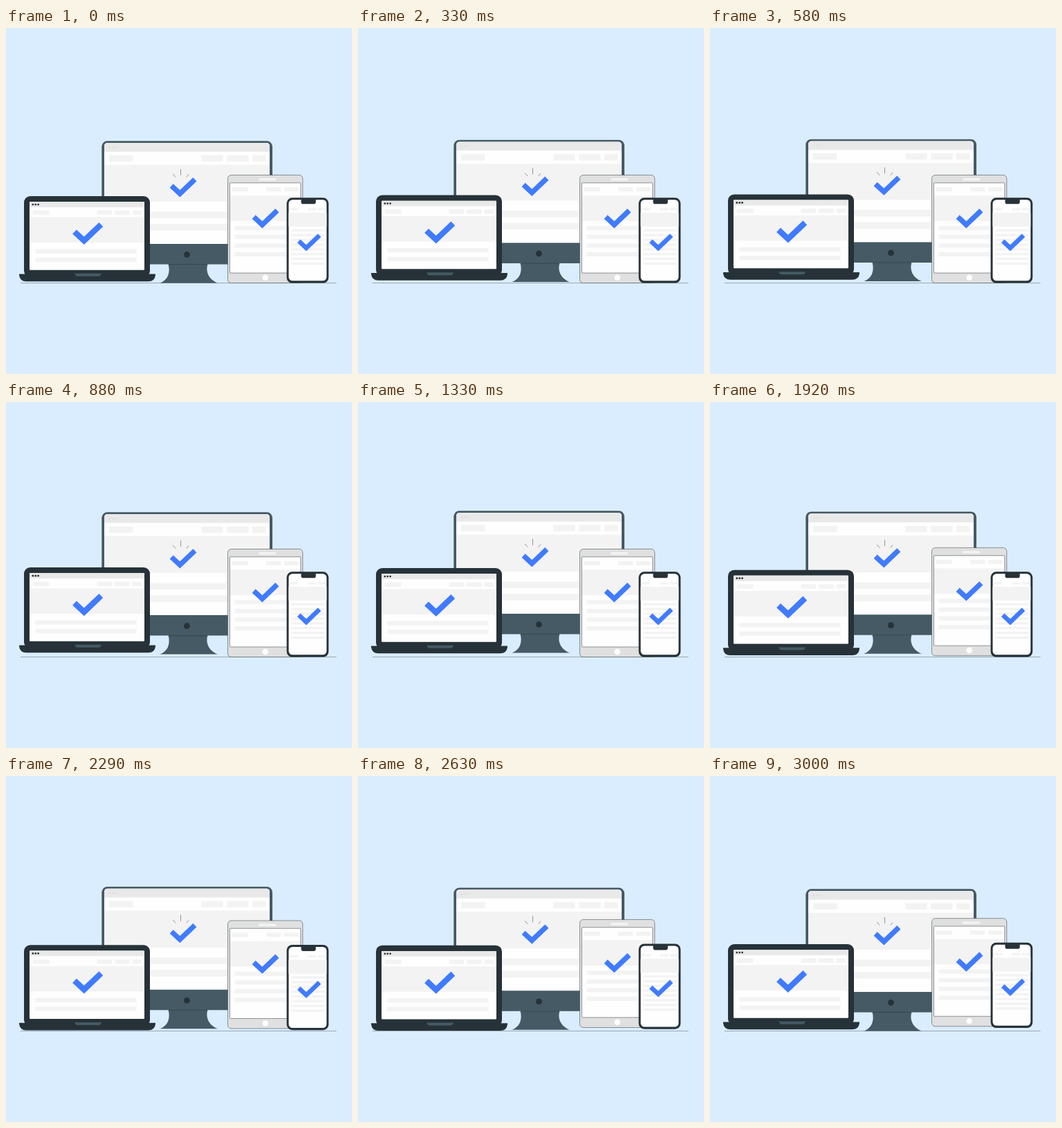
These frames come from a looping animation (500x500 px, 3.04 s). An HTML page:

```html
<!DOCTYPE html>
<html lang="en">
<head>
<meta charset="utf-8">
<title>Floating devices</title>
<style>
  html, body { margin: 0; width: 100%; height: 100%; overflow: hidden; background: #daedff; }
  svg { display: block; width: 100vw; height: 100vh; }
  .dark { fill: #263238; }
  .slate { fill: #455a64; }
  .white { fill: #fefefe; }
  .bar { fill: #e9e9e9; }
  .grey { fill: #e0e0e0; }
  .soft { fill: #f3f3f3; }
  .line { fill: none; stroke: #263238; stroke-width: .5; }
  .check { fill: none; stroke: #407bff; stroke-width: .19; stroke-miterlimit: 9; }
</style>
</head>
<body>
<svg viewBox="0 0 500 500">
  <path class="line" d="M21 368.5H477.5" stroke-opacity=".75"/>
  <g id="monitor"></g>
  <g id="laptop"></g>
  <g id="tablet"></g>
  <g id="phone"></g>
</svg>
<script>
const rect = (cls, x, y, w, h, r = 0) =>
  `<rect class="${cls}" x="${x}" y="${y}" width="${w}" height="${h}" rx="${r}"/>`;
const dot = (cls, x, y, r) => `<circle class="${cls}" cx="${x}" cy="${y}" r="${r}"/>`;
const path = (cls, d) => `<path class="${cls}" d="${d}"/>`;
const repeat = (n, make) => Array.from({ length: n }, (_, i) => make(i)).join('');

// One unit-wide tick, placed by its left edge, lowest point and width
const check = (x, bottom, w) =>
  `<path class="check" transform="translate(${x} ${bottom}) scale(${w})" d="M.068-.422L.38-.133L.933-.66"/>`;

// Horizontal layout of a page, as fractions of its width
const wide = { logo: .145, items: 3, from: .588, gap: .154, item: .13, last: .08, left: .051, right: .93 };
const narrow = { logo: .23, items: 2, from: .514, gap: .254, item: .208, last: .205, left: .071, right: .943 };

function page(x, w, grid, { nav, navH, hero, heroH, row, rowH, pitch, rows }) {
  const block = (from, size) => rect('soft', x + w * from, nav, w * size, navH);
  return block(.028, grid.logo)
    + repeat(grid.items, i =>
        block(grid.from + i * grid.gap, i < grid.items - 1 ? grid.item : grid.last))
    + rect('soft', x, hero, w, heroH)
    + repeat(rows, i =>
        rect('soft', x + w * grid.left, row + i * pitch, w * (grid.right - grid.left), rowH));
}

const art = {
  monitor:
    path('slate', 'M234.500 341C238 354 233.500 364.500 222.500 368.500H306C295 364.500 287.500 354 291.500 341Z')
    + rect('slate', 138.3, 163.3, 246.7, 178.2, 8)
    + path('line', 'M235 341.500H291')
    + path('white', 'M142 312V171Q142 166 147 166H376Q381 166 381 171V312Z')
    + path('bar', 'M142 178.800V171Q142 166 147 166H376Q381 166 381 171V178.800Z')
    + repeat(3, i => dot('grey', 150 + i * 4.75, 172.4, 1.6))
    + page(142, 239, wide, { nav: 183.8, navH: 9.2, hero: 197.7, heroH: 53.3, row: 265.5, rowH: 9.5, pitch: 17.8, rows: 2 })
    + dot('dark', 261.4, 327.5, 4.4)
    + path('line', 'M252.500 204V213M241.300 211L245 215.500M264 211.500L260.800 215.500')
    + check(236.5, 244.5, 39),

  laptop:
    rect('dark', 26, 243, 182, 117, 9)
    + rect('white', 34, 251.2, 166, 98.6, 1)
    + rect('bar', 34, 251.2, 166, 7.8, 1)
    + repeat(3, i => dot('dark', 38.8 + i * 3.9, 255.1, 1.4))
    + page(34, 166, wide, { nav: 263.8, navH: 6.2, hero: 273.3, heroH: 36.7, row: 319.5, rowH: 6.2, pitch: 12.5, rows: 2 })
    + path('dark', 'M19 355.500H216V357Q215 366.300 205.500 366.300H29.500Q20 366.300 19 357Z')
    + path('slate', 'M99 354.800H138.300L136.500 357.500Q135.800 358.800 134 358.800H103.300Q101.500 358.800 100.800 357.500Z')
    + check(96, 313.2, 44.3),

  tablet:
    rect('grey', 320.5, 212.5, 108.3, 156, 5)
    + rect('line', 320.5, 212.5, 108.3, 156, 5)
    + rect('soft', 365, 217, 25.3, 3.5, 1.5)
    + rect('white', 323.4, 223.8, 102.4, 130.2, 1)
    + page(323.4, 102.4, narrow, { nav: 230, navH: 6, hero: 242.3, heroH: 36.7, row: 286.2, rowH: 6.2, pitch: 12.6, rows: 4 })
    + rect('line', 323.4, 223.8, 102.4, 130.2, 1)
    + dot('white', 374.7, 360.8, 4.3)
    + check(355.5, 289.5, 39),

  phone:
    rect('dark', 405.6, 245.3, 60.6, 123.2, 8)
    + rect('white', 408.5, 248.2, 54.8, 117.1, 5.5)
    + page(408.5, 54.8, narrow, { nav: 260.3, navH: 3.3, hero: 267, heroH: 20, row: 290.7, rowH: 3.4, pitch: 6.87, rows: 8 })
    + rect('dark', 426.5, 246, 21.2, 8.2, 2.8)
    + check(420.8, 322.5, 34.5)
};

const parts = {};
for (const name in art) {
  parts[name] = document.getElementById(name);
  parts[name].innerHTML = art[name];
}

const LOOP = 3040, FPS = 24, CYCLE = 3000, LIFT = 6.75;

// Triangle wave: 0 on the ground, 1 at the top
const wave = t => 1 - Math.abs(1 - 2 * (t % CYCLE) / CYCLE);
const delayed = (t, delay) => t < delay ? 0 : wave(t - delay);

function draw(time) {
  const step = Math.floor((time % LOOP + 5) * FPS / 1000);
  const t = Math.min(step * 1000 / FPS, CYCLE);
  const rise = {
    monitor: wave(t),
    laptop: wave(t + 500) - 1 / 3,
    tablet: delayed(t, 1500),
    phone: delayed(t, 2000)
  };
  for (const name in rise)
    parts[name].setAttribute('transform', `translate(0 ${-rise[name] * LIFT})`);
}

const start = performance.now();
(function tick() {
  draw(performance.now() - start);
  requestAnimationFrame(tick);
})();
</script>
</body>
</html>
```
